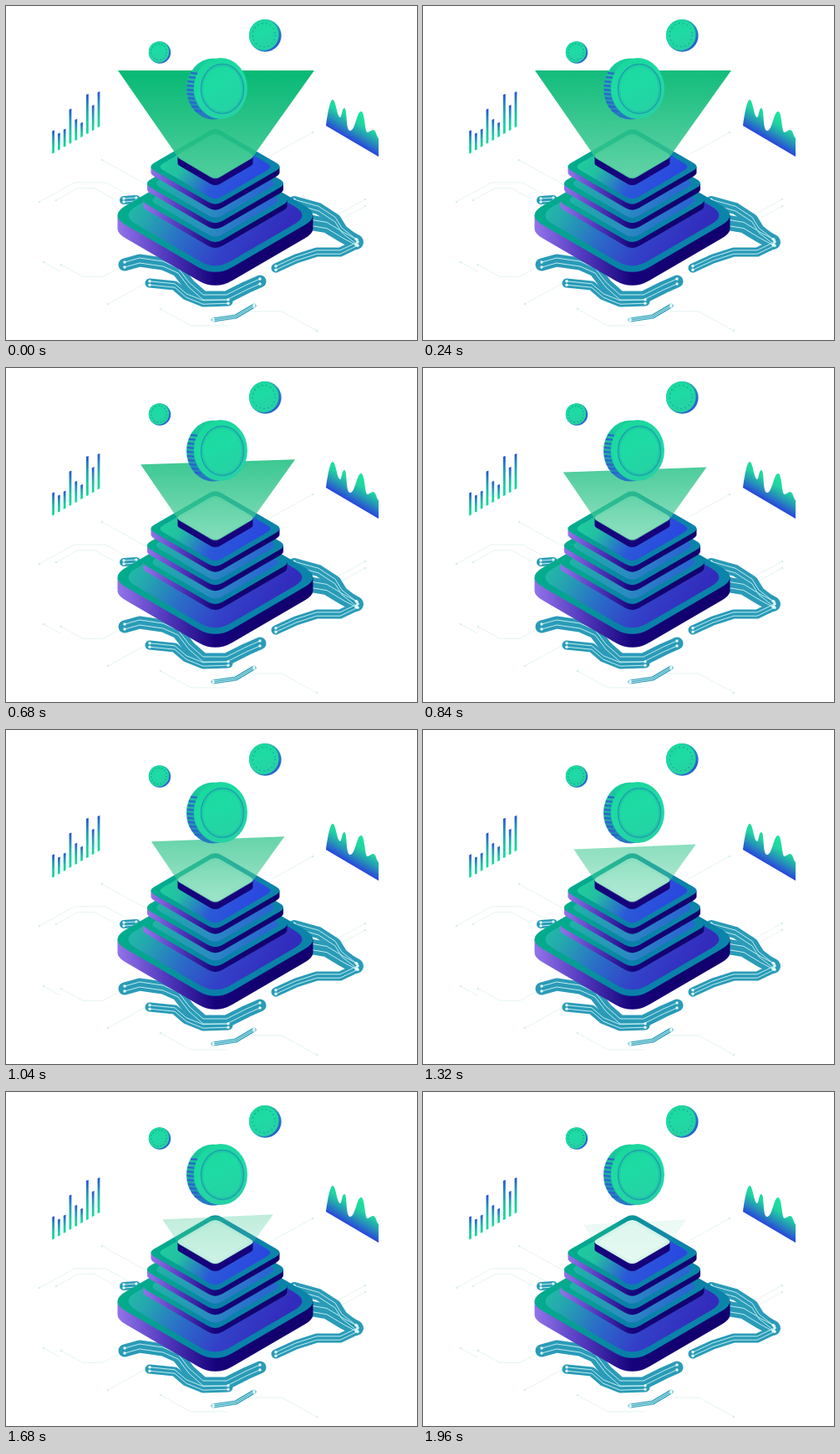
Animation of 492 by 399 pixels, one loop 2.76 s. Source, as an HTML page:

```html
<!DOCTYPE html>
<html lang="en">
<head>
<meta charset="utf-8">
<title>Light beam over a stacked platform</title>
<style>
html, body { margin: 0; width: 100%; height: 100%; overflow: hidden; background: #fff; }
svg { display: block; width: 492px; height: 399px; }
</style>
</head>
<body>
<svg id="stage" viewBox="0 0 492 399"></svg>
<script>
const stage = document.getElementById('stage');
const CX = 250.5, ISO = .58;

const stops = colors => colors.map((c, i) => `<stop offset="${i / (colors.length - 1)}" stop-color="${c}"/>`).join('');
const gradient = (id, dir, ...colors) =>
  `<linearGradient id="${id}" x1="0" y1="0" x2="${dir[0]}" y2="${dir[1]}">${stops(colors)}</linearGradient>`;
const shape = (d, fill) => `<path d="${d}" fill="${fill}"/>`;
const line = (d, color, width, extra = '') =>
  `<path d="${d}" fill="none" stroke="${color}" stroke-width="${width}" ${extra}/>`;
const oval = (cx, cy, rx, ry, fill, extra = '') =>
  `<ellipse cx="${cx}" cy="${cy}" rx="${rx}" ry="${ry}" fill="${fill}" ${extra}/>`;
const ring = (cx, cy, rx, ry, color, width, dash = 'none') =>
  oval(cx, cy, rx, ry, 'none', `stroke="${color}" stroke-width="${width}" stroke-dasharray="${dash}"`);

// Clockwise rounded rhombus; w is its visible half width, k the share of each edge that is rounded.
function rhomb(cy, w, k) {
  const a = w / (1 - k / 2), b = a * ISO, p = a * (1 - k), q = b * (1 - k);
  return `M${CX - p} ${cy + b * k}Q${CX - a} ${cy} ${CX - p} ${cy - b * k}` +
    `L${CX - a * k} ${cy - q}Q${CX} ${cy - b} ${CX + a * k} ${cy - q}` +
    `L${CX + p} ${cy - b * k}Q${CX + a} ${cy} ${CX + p} ${cy + b * k}` +
    `L${CX + a * k} ${cy + q}Q${CX} ${cy + b} ${CX - a * k} ${cy + q}Z`;
}

function slab(cy, w, depth, k, inset, side, rim, panel) {
  const body = rhomb(cy + depth, w, k) + `M${CX - w} ${cy}h${2 * w}v${depth}h${-2 * w}Z`;
  return shape(body, side) + shape(rhomb(cy, w, k), rim) + shape(rhomb(cy, w - inset, k), panel);
}

const defs = '<defs>' +
  gradient('side', [1, 0], '#9274ea', '#5138bd', '#16037c', '#12006e', '#12006e') +
  gradient('rim', [1, .3], '#00b488', '#05a392', '#087fa8', '#0b84aa') +
  gradient('base', [1, .35], '#1fcf9c', '#24a8ae', '#2a6cc8', '#3340c8', '#322cbc') +
  gradient('mid', [1, .3], '#1ec09e', '#22a3b0', '#2a8cc0', '#2a66d2') +
  gradient('upper', [1, .35], '#1cd898', '#22bfa2', '#2b58d8', '#2a48e0') +
  gradient('bar', [0, 1], '#2450d8', '#2596bc', '#1cc8a4', '#18dc9c') +
  gradient('edge', [-.3, 1], '#18cf9a', '#1fa9a9', '#2b50d6') +
  gradient('coin', [1, .8], '#18d69a', '#1fb0a8', '#2b50d6') +
  gradient('face', [.4, 1], '#18d69a', '#1edba4', '#25d2a4') +
  '<linearGradient id="area" gradientUnits="userSpaceOnUse" x1="431" y1="132" x2="414" y2="161">' +
  stops(['#1ce49c', '#20d3a2', '#2592b8', '#2846dc']) + '</linearGradient>' +
  '<linearGradient id="light" gradientUnits="userSpaceOnUse" x1="0" x2="0" y2="205">' +
  stops(['#07b974', '#07b974']) + '</linearGradient></defs>';

// A circuit board is a thick band with thin traces running along it.
const bands = [
  [10, 'M141 232L156 231'],
  [15, 'M142 309L160 304 188 308 206 316 219 333 236 348 264 348 288 336 304 329'],
  [11, 'M172 331L202 334 216 346 236 354 266 353'],
  [5, 'M248 375L275 371 297 358'],
  [14, 'M345 234L374 242 394 255 402 268 420 282'],
  [18, 'M360 258L384 262 404 274 419 282'],
  [11, 'M323 313L347 302 372 294 400 294 421 284']
];
const round = 'stroke-linejoin="round" stroke-linecap="round"';
const boards = '<marker id="dot" viewBox="-2 -2 4 4" markerWidth="4" markerHeight="4">' +
  '<circle r="1.7" fill="#e2fafa"/></marker>' +
  bands.map(([w, d]) => line(d, '#2a9bb8', w, round)).join('') +
  bands.map(([w, d]) => [-w / 5, w / 5].map(dy => line(d, '#bfecee', 1,
    `transform="translate(0 ${dy})" marker-start="url(#dot)" marker-end="url(#dot)"`)).join('')).join('');

// Faint trace: a slanted run, a flat part and a run back; dir is 1 when it starts downwards.
function faint(x, y, dir, run, flat = 0, back = 0) {
  const rise = n => dir * Math.abs(n) * .55;
  return line(`M${x} ${y}l${run} ${rise(run)}h${flat}l${back} ${-rise(back)}`, '#dff1ef', .8) +
    oval(x, y, 1.3, 1.3, '#d5eeec');
}
const outskirts = faint(40, 234, -1, 42, 37, 28) + faint(60, 232, -1, 26, 20, 24) + faint(115, 184, 1, 53) +
  faint(367, 151, 1, -49) + faint(430, 231, 1, -30, -26) + faint(430, 239, 1, -28) +
  faint(45, 306, 1, 20) + faint(66, 309, 1, 26, 24, 22) + faint(122, 356, -1, 50) +
  faint(185, 362, 1, 36, 44) + faint(372, 388, -1, -42, -40);

const bars = [27, 20, 21, 41, 25, 17, 47, 30, 42].map((h, i) => {
  const x = 55.2 + 6.8 * i, foot = 176.5 - 3.9 * i;
  return shape(`M${x} ${foot - h}l2.8-1.2v${h}l-2.8 1.2Z`, 'url(#bar)');
}).join('');

const area = shape('M383 143C385 128 388 112 391 112C395 112 396 132 400 133C402 133 402 122 405 122' +
  'C409 122 406 149 412 149C418 149 420 126 425 126C430 126 429 151 433 151' +
  'C436 150 437 148 440 148C443 149 444 157 446 158V180Z', 'url(#area)');

const smallCoin = (x, y, r) => oval(x, y, r, r, 'url(#coin)') +
  oval(x - r * .08, y - r * .04, r * .92, r * .95, 'url(#face)') +
  ring(x - r * .08, y - r * .04, r * .7, r * .73, '#139b92', 1.2, `1.3 ${r * .2}`);

const ridges = Array.from({ length: 10 }, (_, i) => {
  const y = 80 + i * 5, x = 248 - 31.5 * Math.sqrt(1 - ((y - 99) / 36.5) ** 2);
  return line(`M${x} ${y}l8 .8`, '#2b5fd2', 2);
}).join('');

const bigCoin = oval(248, 99, 32, 36.5, 'url(#edge)') + ridges +
  oval(257, 98.5, 32, 36.5, 'url(#face)') +
  ring(259, 99, 25.5, 29.5, '#1b9fae', 1.5) + ring(259, 99, 23.5, 27.5, '#20b8a6', .7);

const layers = [0, 1, 2].map(i =>
  slab(232 - 20 * i, 86 - 4.5 * i, 7, .1, 11, 'url(#side)', 'url(#rim)', i < 2 ? 'url(#mid)' : 'url(#upper)')).join('');

stage.innerHTML = defs + outskirts + boards + bars + area +
  slab(250, 117, 16, .16, 13, 'url(#side)', 'url(#rim)', 'url(#base)') + layers +
  slab(179, 45, 9, .12, 6, '#16037c', '#e0f8f1', '#effcf8') +
  '<path id="haze" fill="#fff"/><path id="beam" fill="url(#light)"/>' +
  smallCoin(184, 55.5, 13.2) + smallCoin(310.3, 35.4, 19.3) + bigCoin;

const [haze, beam, light] = ['haze', 'beam', 'light'].map(id => document.getElementById(id));
const [topStop, footStop] = light.children;

const LOOP = 2760, STEP = 40, FADE = 1960, SINK = 480;

function draw(now) {
  const t = Math.min(FADE, Math.floor(now % LOOP / STEP) * STEP);
  const u = t / FADE;
  const v = Math.max(0, (t - SINK) / (FADE - SINK));
  const mid = 77 + 78.5 * v ** .4;
  const tilt = v > 0 ? 3 : 0;
  const left = mid + tilt, right = mid - tilt;
  const lx = 134 + (left - 77) * .71, rx = 369 - (right - 77) * .71;
  const below = .7 - .65 * u;
  const d = `M${lx} ${left}L${rx} ${right} 294 182 256 204.5Q${CX} 208 245 204.5L207 182Z`;
  haze.setAttribute('d', d);
  beam.setAttribute('d', d);
  haze.setAttribute('opacity', below * .8);
  light.setAttribute('y1', right);
  topStop.setAttribute('stop-opacity', 1 - .92 * u ** 1.4);
  footStop.setAttribute('stop-opacity', below);
}

const start = performance.now();
(function tick() {
  draw(performance.now() - start);
  requestAnimationFrame(tick);
})();
</script>
</body>
</html>
```
